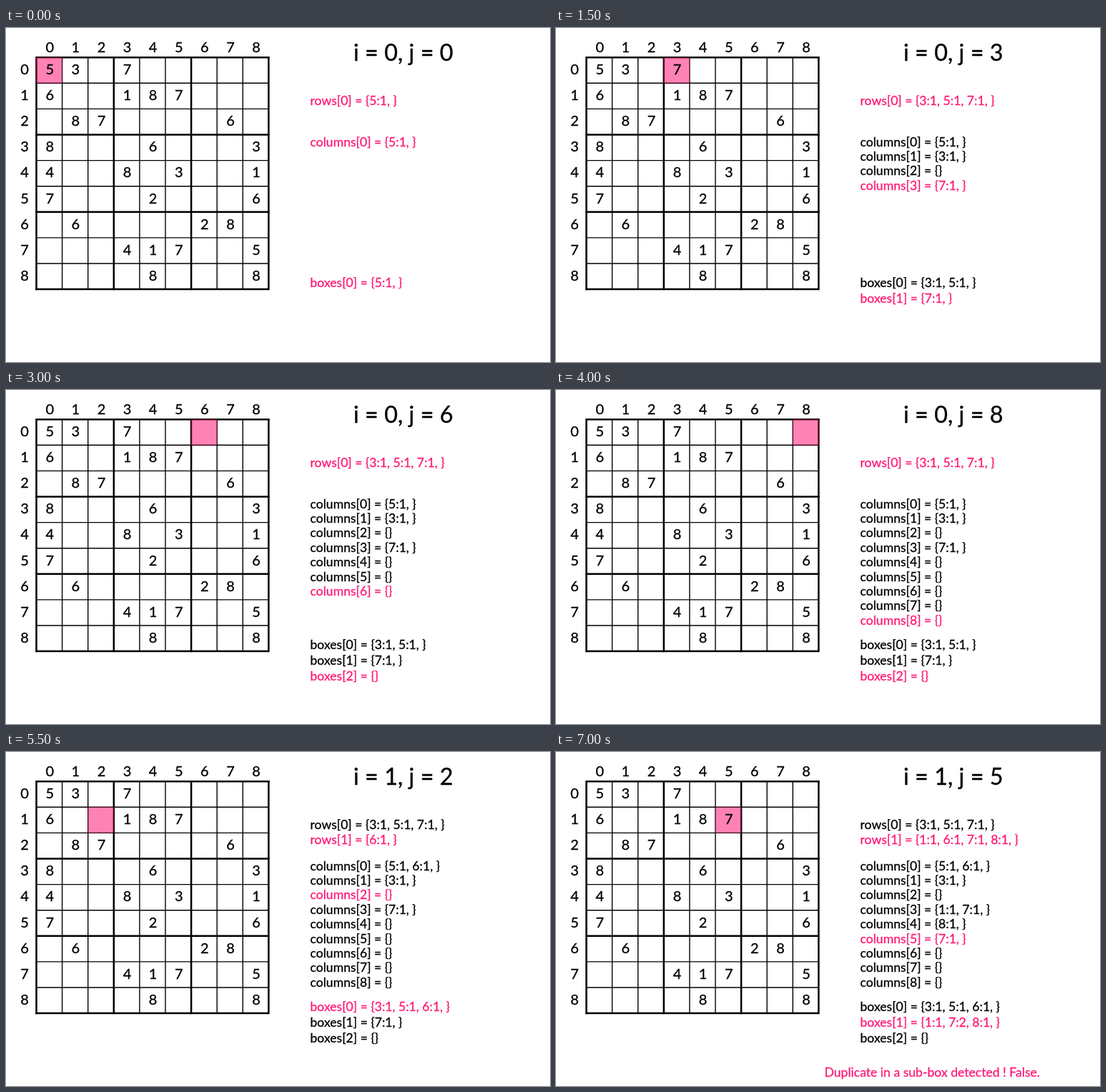
Animation of 761x468 px, one loop 7500 ms. Source, as an HTML page:

```html
<!DOCTYPE html>
<html lang="en">
<head>
<meta charset="utf-8">
<title>Sudoku check</title>
<style>
  html, body { margin: 0; width: 100%; height: 100%; overflow: hidden; background: #fff; }
  svg { display: block; width: 761px; height: 468px; font-family: Lato, "Open Sans", sans-serif; }
  text { fill: currentColor; stroke: currentColor; stroke-width: .3; color: #000; }
  .digit { font-size: 20px; text-anchor: middle; }
  .note { font-size: 17.6px; white-space: pre; }
  .title { font-size: 32.4px; }
  .active { color: #ff1a75; }
</style>
</head>
<body>
<svg id="stage" viewBox="0 0 761 468"></svg>
<script>
const STEP = 500, SIZE = 9, STEPS = 15;
const CELL = 36.1, LEFT = 42.5, TOP = 41.2;
const stage = document.getElementById("stage");

const board = [
  "53.7.....",
  "6..187...",
  ".87....6.",
  "8...6...3",
  "4..8.3..1",
  "7...2...6",
  ".6....28.",
  "...417..5",
  "....8...8"
];

function add(tag, attrs, content = "") {
  const node = document.createElementNS("http://www.w3.org/2000/svg", tag);
  for (const key in attrs) node.setAttribute(key, attrs[key]);
  node.textContent = content;
  return stage.appendChild(node);
}

const digitX = col => LEFT + (col + 0.52) * CELL;
const digitY = row => TOP + (row + 0.46) * CELL;
const addDigit = (value, x, y) => add("text", { class: "digit", x, y: y + 7.2 }, value);
const addNote = (x, y) => add("text", { class: "note", x, y });
const addNotes = (count, y, gap) =>
  Array.from({ length: count }, (_, n) => addNote(425.5, y + n * gap));

for (let n = 0; n <= SIZE; n++) {
  const x = LEFT + n * CELL, y = TOP + n * CELL, length = SIZE * CELL;
  add("path", {
    d: `M${x} ${TOP}v${length}M${LEFT} ${y}h${length}`,
    stroke: "#000", "stroke-width": n % 3 ? 1.4 : 2.5, "stroke-linecap": "square"
  });
}

// Translucent, so the grid lines beneath it turn crimson
const marker = add("rect", {
  width: CELL, height: CELL, fill: "#ff1070", "fill-opacity": 0.52
});

board.forEach((line, row) => {
  addDigit(row, digitX(row), 27);
  addDigit(row, 26, digitY(row));
  [...line].forEach((value, col) => {
    if (value !== ".") addDigit(value, digitX(col), digitY(row));
  });
});

const title = add("text", { class: "title", x: 486, y: 46 });
const groups = [
  { name: "rows", notes: addNotes(2, 108.3, 20.5), index: (i, j) => i },
  { name: "columns", notes: addNotes(9, 165.5, 20.4), index: (i, j) => j },
  { name: "boxes", notes: addNotes(3, 363, 21.9),
    index: (i, j) => 3 * Math.floor(i / 3) + Math.floor(j / 3) }
];
const verdict = addNote(375.5, 455);
verdict.classList.add("active");

const cellAt = step => [Math.floor(step / SIZE), step % SIZE];

function countDigits(group, lastStep) {
  const counts = [];
  for (let step = 0; step <= lastStep; step++) {
    const [i, j] = cellAt(step), value = board[i][j];
    const entry = counts[group.index(i, j)] ??= {};
    if (value !== ".") entry[value] = (entry[value] || 0) + 1;
  }
  return counts;
}

function show(step) {
  const [i, j] = cellAt(step);
  let duplicate = false;
  marker.setAttribute("x", LEFT + j * CELL);
  marker.setAttribute("y", TOP + i * CELL);
  title.textContent = `i = ${i}, j = ${j}`;

  for (const group of groups) {
    const counts = countDigits(group, step);
    group.notes.forEach((note, n) => {
      const entries = Object.entries(counts[n] || {});
      const list = entries.map(([value, count]) => `${value}:${count}, `).join("");
      note.textContent = counts[n] ? `${group.name}[${n}] = {${list}}` : "";
      note.classList.toggle("active", n === group.index(i, j));
      duplicate ||= entries.some(([, count]) => count > 1);
    });
  }
  verdict.textContent = duplicate ? "Duplicate in a sub-box detected ! False." : "";
}

const start = performance.now();
let shown = -1;
function tick() {
  const step = Math.floor((performance.now() - start) / STEP) % STEPS;
  if (step !== shown) show(shown = step);
  requestAnimationFrame(tick);
}
tick();
</script>
</body>
</html>
```
